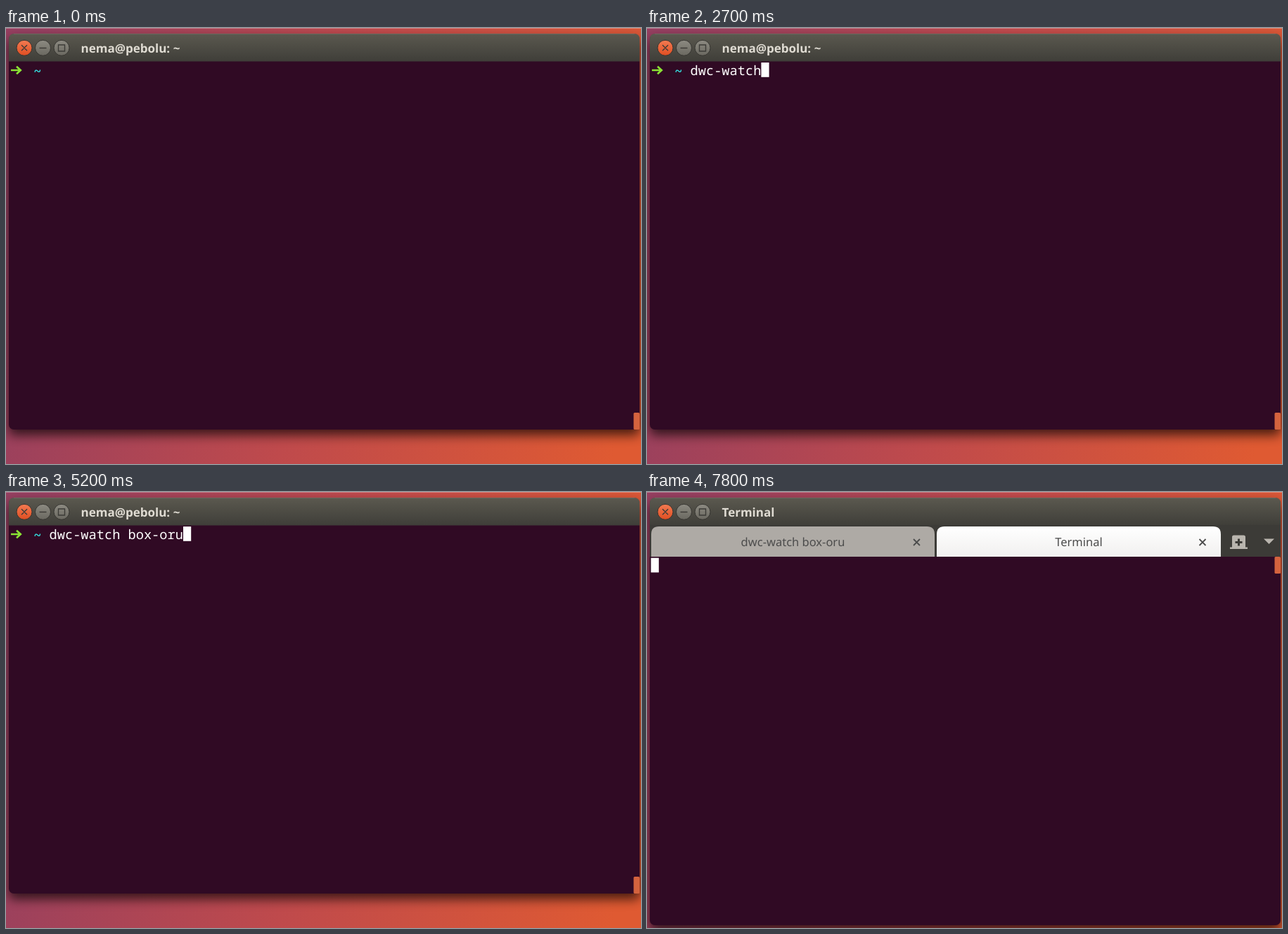
Animation, 903 px wide and 620 px high, one loop 8000 ms. Source, as an HTML page:

```html
<!DOCTYPE html>
<html lang="en">
<head>
<meta charset="utf-8">
<title>Terminal</title>
<style>
html, body { margin: 0; width: 100%; height: 100%; overflow: hidden; background: #a8435a; }
svg { display: block; width: 903px; height: 620px; text-rendering: geometricPrecision; }
.mono { font: 18.667px "Noto Sans Mono", "DejaVu Sans Mono", monospace; fill: #fff; }
.tilde { font-weight: 700; fill: #34e2e2; }
.title { font: 700 17px "Noto Sans", "Open Sans", sans-serif; fill: #dfdbd2; }
.label { font: 16.5px "Noto Sans", "Open Sans", sans-serif; fill: #4c4c4c; text-anchor: middle; }
.line { fill: none; stroke: #3c3b37; stroke-width: 1.4; }
.cross { fill: none; stroke: #4c4c4c; stroke-width: 1.8; }
</style>
</head>
<body>
<svg viewBox="0 0 903 620">
  <defs>
    <linearGradient id="desk" gradientUnits="userSpaceOnUse" x1="0" y1="230" x2="903" y2="430">
      <stop offset="0" stop-color="#953f60"/>
      <stop offset=".5" stop-color="#bf4a4c"/>
      <stop offset="1" stop-color="#df5a32"/>
    </linearGradient>
    <linearGradient id="bar" x2="0" y2="1">
      <stop offset="0" stop-color="#5b594f"/>
      <stop offset="1" stop-color="#3f3e39"/>
    </linearGradient>
    <linearGradient id="red" x2="0" y2="1">
      <stop offset="0" stop-color="#f37b52"/>
      <stop offset="1" stop-color="#df4e22"/>
    </linearGradient>
    <linearGradient id="grey" x2="0" y2="1">
      <stop offset="0" stop-color="#8d8b82"/>
      <stop offset="1" stop-color="#6a6860"/>
    </linearGradient>
    <linearGradient id="front" x2="0" y2="1">
      <stop offset="0" stop-color="#fff"/>
      <stop offset="1" stop-color="#f1f0ef"/>
    </linearGradient>
    <filter id="blur" x="-10%" y="-10%" width="120%" height="120%">
      <feGaussianBlur stdDeviation="8"/>
    </filter>
  </defs>

  <rect width="903" height="620" fill="url(#desk)"/>
  <rect width="903" height="1" fill="#fff" opacity=".3"/>
  <rect class="frame" x="4" y="17" width="897" height="562" rx="6" opacity=".68" filter="url(#blur)"/>
  <rect class="frame" x="4" y="9" width="897" height="562" rx="7" fill="#300a24"/>
  <path d="M4 47.5V16q0-8 8-8H893q8 0 8 8V47.5z" fill="url(#bar)"/>
  <path d="M11 8.5H894" stroke="#6b695f"/>

  <g stroke="#353430">
    <circle cx="26" cy="28.3" r="11" fill="url(#red)"/>
    <circle cx="52.5" cy="28.3" r="11" fill="url(#grey)"/>
    <circle cx="79" cy="28.3" r="11" fill="url(#grey)"/>
  </g>
  <path class="line" d="M22 24.3l8 8m0-8l-8 8M47.5 28.5h10M74.5 24h9v9h-9z"/>
  <text id="title" class="title" x="106.5" y="35"></text>

  <g id="shell">
    <path d="M7 60H19M15 54.8L20.8 60L15 65.2" fill="none" stroke="#8ae234" stroke-width="2.6"/>
    <text class="mono tilde" x="39.2" y="67.5">~</text>
    <text id="command" class="mono" x="61.6" y="66.5"></text>
    <text id="reply" class="mono" x="5.6" y="87.2">Listening for incoming Doorward Clerk requests...</text>
  </g>

  <g id="tabs">
    <rect x="4" y="47" width="897" height="45" fill="#3c3b37"/>
    <path d="M6 92V60q0-11 11-11H398q11 0 11 11V92z" fill="#aeaaa5"/>
    <path d="M412 92V60q0-11 11-11H805q11 0 11 11V92z" fill="url(#front)"/>
    <text class="label" x="207.5" y="77">dwc-watch box-oru</text>
    <text class="label" x="614" y="77">Terminal</text>
    <path class="cross" d="M379 67l9 9m0-9l-9 9M785.5 67l9 9m0-9l-9 9"/>
    <path d="M829 81V78.5H832V64q0-2.5 2.5-2.5H848.5q2.500 0 2.500 2.500V78.500H854V81zM877 66.500h15l-7.500 7.500z" fill="#b9b5ae"/>
    <path d="M836.500 71.500h10m-5-5v10" stroke="#3c3b37" stroke-width="3"/>
  </g>

  <rect id="thumb" x="892.500" width="8.500" height="24" rx="1.500" fill="#d4633e"/>
  <rect id="cursor" width="11.200" height="20.700" fill="#fff"/>
</svg>
<script>
const LOOP = 8000, CELL = 11.2;
const COMMAND = "dwc-watch box-oru";
const KEYS = [500, 800, 1100, 1400, 1800, 2100, 2300, 2500, 2700,
  3200, 3400, 3600, 3900, 4200, 4600, 4900, 5200];
const ENTER = 5500, REPLY = 6700, NEW_TAB = 7800;
const HIDDEN = [[0, 100], [6000, 6600], [7200, 7400]];

const el = id => document.getElementById(id);
const set = (id, name, value) => el(id).setAttribute(name, value);
const show = (id, on) => set(id, "visibility", on ? "visible" : "hidden");
const frames = document.querySelectorAll(".frame");

function draw(t) {
  const tabbed = t >= NEW_TAB, entered = t >= ENTER, replied = t >= REPLY;
  const typed = KEYS.filter(k => t >= k).length;

  el("title").textContent = tabbed ? "Terminal" : entered ? COMMAND : "nema@pebolu: ~";
  el("command").textContent = COMMAND.slice(0, typed);
  show("shell", !tabbed);
  show("reply", replied && !tabbed);
  show("tabs", tabbed);
  set("thumb", "y", tabbed ? 92 : 547);
  frames.forEach(f => f.setAttribute("height", tabbed ? 607 : 562));

  set("cursor", "x", entered ? 5.6 : 61.6 + typed * CELL);
  set("cursor", "y", tabbed ? 93.7 : replied ? 90.5 : entered ? 69.8 : 49.1);
  show("cursor", !HIDDEN.some(([from, to]) => t >= from && t < to));
}

function tick() {
  draw(performance.now() % LOOP);
  requestAnimationFrame(tick);
}
tick();
</script>
</body>
</html>
```
